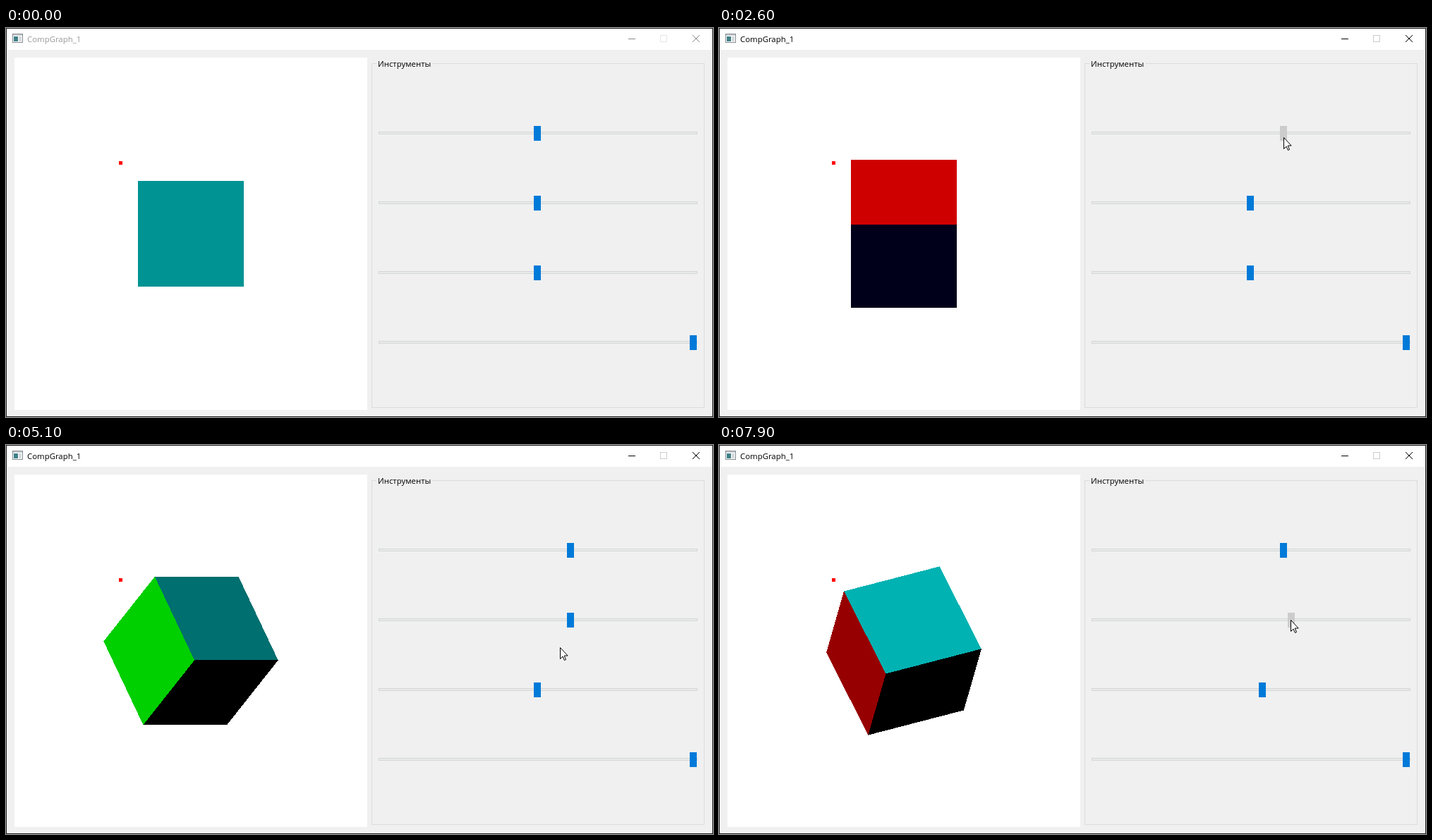
An HTML page for the animation above (8 s loop, 1002 by 552 pixels).

```html
<!DOCTYPE html>
<html lang="ru">
<head>
<meta charset="utf-8">
<title>CompGraph_1</title>
<style>
  html, body { margin: 0; width: 100%; height: 100%; overflow: hidden; background: #f0f0f0; }
  svg { display: block; width: 1002px; height: 552px; }
  text { font: 11.4px "Open Sans", "Noto Sans", sans-serif; }
  .crisp { shape-rendering: crispEdges; }
  .line { fill: none; stroke: #000; }
  .off { stroke: #ccc; }
  .inactive .caption { fill: #999; }
  .inactive .line { stroke: #8a8a8a; }
  .inactive .off { stroke: #e6e6e6; }
  .groove { fill: #e7eaea; stroke: #d6d6d6; }
  .thumb { fill: #007ad9; }
  .thumb.held { fill: #ccc; }
</style>
</head>
<body>
<svg id="stage" viewBox="0 0 1002 552">
  <rect width="1002" height="552" fill="#f0f0f0"/>
  <rect width="1002" height="31" fill="#fff"/>
  <g id="titlebar">
    <g class="crisp">
      <rect x="9.5" y="8.5" width="14" height="12" fill="#fff" stroke="#858b90"/>
      <rect x="10" y="9" width="13" height="2" fill="#c9ced2"/>
      <rect x="11" y="12" width="6" height="7" fill="#3f7f86"/>
      <rect x="18" y="12" width="4" height="7" fill="#d5d9dc"/>
      <path class="line" d="M882 15.5h10"/>
      <rect class="line off" x="927.5" y="10.5" width="9" height="9"/>
    </g>
    <path class="line" d="M973 10l10 10m0-10l-10 10"/>
    <text class="caption" x="30" y="20">CompGraph_1</text>
  </g>
  <rect x="12" y="42" width="500" height="500" fill="#fff"/>
  <g id="cube" class="crisp"></g>
  <rect x="160" y="189" width="5" height="5" fill="#f00"/>
  <rect class="crisp" x="518.5" y="50.5" width="471" height="488" fill="none" stroke="#dcdcdc"/>
  <rect x="525" y="44" width="79" height="13" fill="#f0f0f0"/>
  <text x="527" y="55">Инструменты</text>
  <g id="sliders" class="crisp"></g>
  <path id="cursor" d="M.5.5v16l3.5-3.5 2.5 5.5 2-1-2.3-5.5h5z" fill="#fff" stroke="#000"/>
  <rect class="crisp" x=".5" y=".5" width="1001" height="551" fill="none" stroke="#222"/>
</svg>
<script>
const LOOP = 8000, STEP = 100, APPEAR = 200, ACTIVATE = 1100;
const HALF = 75, CENTER = [262, 292];
const X = 0, Y = 1, Z = 2;

// The pointer arrives at a slider, pulls it evenly to a value, then leaves.
// Each drag turns the cube further about one fixed axis.
const DRAGS = [
  { axis: X, arrive: 900, start: 1160, end: 2600, leave: 2600, to: 38, grip: 0, y: 149, sink: 6 },
  { axis: Y, arrive: 3000, start: 3000, end: 4820, leave: 4820, to: 38, grip: 1, y: 252, sink: 0 },
  { axis: Z, arrive: 5500, start: 5500, end: 6260, leave: 6600, to: 14, grip: 4, y: 347, sink: 0 },
  { axis: Y, arrive: 7350, start: 7400, end: 7800, leave: LOOP, to: 47, grip: -1, y: 248, sink: 0 }
];

// Two opposite faces per axis: positive side, negative side.
const COLORS = [
  [[0, 1, 0], [1, 1, 0]],
  [[1, 0, 1], [1, 0, 0]],
  [[0, 1, 1], [0, 0, 1]]
];

const byId = id => document.getElementById(id);
const lerp = (a, b, f) => a + (b - a) * f;
const progress = (t, a, b) => Math.min(1, Math.max(0, (t - a) / (b - a)));
const smooth = f => f * f * (3 - 2 * f);
const thumbOffset = value => value * 221 / 180;

function add(parent, tag, attrs = {}) {
  const el = document.createElementNS("http://www.w3.org/2000/svg", tag);
  for (const name in attrs) el.setAttribute(name, attrs[name]);
  return parent.appendChild(el);
}

const thumbs = [0, 1, 2, 3].map(i => {
  const y = 139 + 99 * i;
  add(byId("sliders"), "rect", { class: "groove", x: 528.5, y: y + 8.5, width: 451, height: 3 });
  return add(byId("sliders"), "rect", { class: "thumb", x: 969, y, width: 10, height: 21 });
});

const faces = COLORS.flatMap((pair, axis) => pair.map((rgb, i) =>
  ({ axis, rgb, sign: 1 - 2 * i, el: add(byId("cube"), "polygon") })));

function rotate(p, axis, angle) {
  const i = (axis + 1) % 3, j = (axis + 2) % 3;
  const c = Math.cos(angle), s = Math.sin(angle), q = p.slice();
  q[i] = p[i] * c - p[j] * s;
  q[j] = p[i] * s + p[j] * c;
  return q;
}

function drawCube(basis) {
  for (const { axis, sign, rgb, el } of faces) {
    const n = basis[axis].map(v => v * sign);
    const visible = n[2] > 1e-6;
    el.style.display = visible ? "" : "none";
    if (!visible) continue;
    const u = basis[(axis + 1) % 3], v = basis[(axis + 2) % 3];
    const corners = [[-1, -1], [1, -1], [1, 1], [-1, 1]].map(([a, b]) => {
      const [x, y] = n.map((c, i) => (c + a * u[i] + b * v[i]) * HALF);
      return (CENTER[0] + x).toFixed(2) + "," + (CENTER[1] - y).toFixed(2);
    });
    // Light comes from the upper left, in front.
    const light = Math.max(0, (n[1] - n[0] + n[2]) / Math.sqrt(3));
    el.setAttribute("points", corners.join(" "));
    el.setAttribute("fill", `rgb(${rgb.map(c => Math.round(c * light * 255))})`);
  }
}

// Time runs in steps, and one step is skipped every 1255 ms.
function stepTime(time) {
  const t = Math.floor(time / STEP) * STEP;
  return (t + 949) % 1255 < STEP ? t - STEP : t;
}

function draw(time) {
  const t = stepTime(time);
  const values = [0, 0, 0];
  let basis = [[1, 0, 0], [0, 1, 0], [0, 0, 1]];
  let pointer = [22, -12], left = APPEAR, held = -1;

  for (const { axis, arrive, start, end, leave, to, grip, y, sink } of DRAGS) {
    if (t < left) break;
    const from = values[axis], pull = progress(t, start, end);
    const value = Math.round(lerp(from, to, pull));
    const target = [753 + thumbOffset(value) + grip, y + sink * pull];
    const travel = smooth(progress(t, left, arrive));
    pointer = pointer.map((p, i) => lerp(p, target[i], travel));
    basis = basis.map(p => rotate(p, axis, (value - from) / 10));
    values[axis] = value;
    if (t > start - STEP && t <= leave) held = axis;
    left = leave;
  }

  drawCube(basis);
  values.forEach((v, i) => {
    thumbs[i].setAttribute("x", 748 + Math.round(thumbOffset(v)));
    thumbs[i].classList.toggle("held", i === held);
  });
  byId("titlebar").classList.toggle("inactive", t < ACTIVATE);

  const [x, y] = pointer.map(Math.round);
  byId("cursor").setAttribute("transform", `translate(${x} ${y})`);
  byId("cursor").style.display = t < APPEAR ? "none" : "";
}

function tick() {
  draw(performance.now() % LOOP);
  requestAnimationFrame(tick);
}
tick();
</script>
</body>
</html>
```
